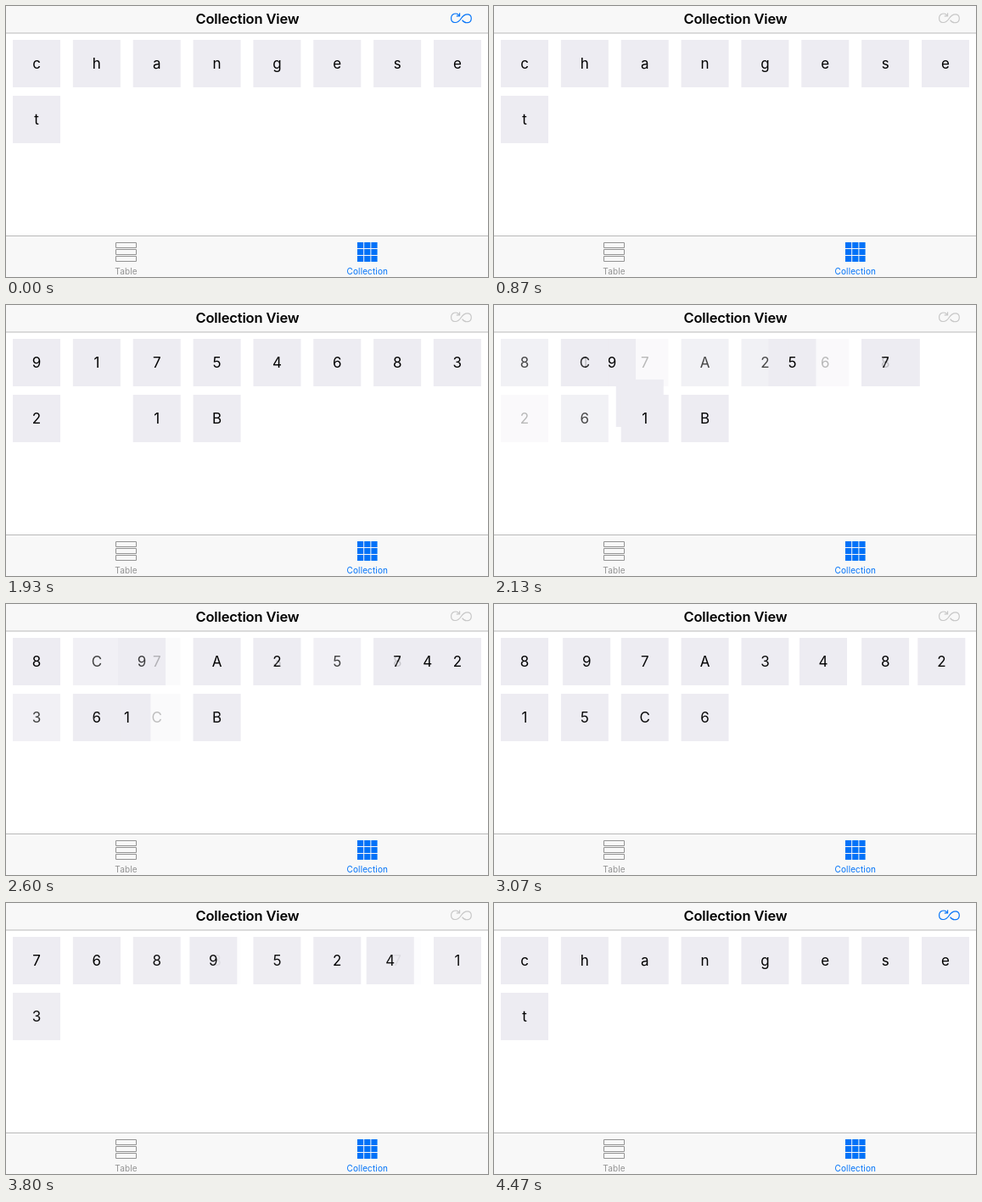
These frames come from a looping animation (568 px wide and 320 px high, 5000 ms). An HTML page:

```html
<!DOCTYPE html>
<html lang="en">
<head>
<meta charset="utf-8">
<title>Collection View</title>
<style>
  html, body { margin: 0; width: 100%; height: 100%; overflow: hidden; background: #fff; }
  #stage { position: relative; width: 568px; height: 320px; overflow: hidden; background: #fff; }
  #stage, text { font-family: Inter, Roboto, sans-serif; }
  svg { position: absolute; left: 0; top: 0; }
  .cell {
    position: absolute; left: 0; top: 0; width: 56px; height: 56px;
    background: #edecf2; color: #000;
    font-size: 17px; line-height: 56px; text-align: center;
  }
  .title { font-size: 16.5px; font-weight: 600; letter-spacing: -.15px; }
  .tab { font-size: 10px; letter-spacing: .12px; }
</style>
</head>
<body>
<div id="stage">
  <svg width="568" height="320" viewBox="0 0 568 320">
    <path fill="#f8f8f8" d="M0 0H568V32H0ZM0 271H568V320H0Z"/>
    <path fill="#b9b9b9" d="M0 31.5H568V32.5H0ZM0 271H568V272H0Z"/>
    <text class="title" x="284.5" y="21" text-anchor="middle">Collection View</text>
    <g id="loop" fill="none" stroke-width="1.15">
      <path d="M534 11.2C531 7.2 524.6 9 524.6 14.5C524.6 20.8 532.2 21.4 536.3 14.8S548.3 8.4 548.3 14.4C548.3 20.8 540.6 21.2 537.6 16.6"/>
      <path d="M534.6 8.2V11.8H530.8"/>
    </g>
    <path fill="none" stroke="#929292" d="M129.5 279.5h24v6h-24zM129.5 287.5h24v6h-24zM129.5 295.5h24v6h-24z"/>
    <text class="tab" x="141.5" y="317" text-anchor="middle" fill="#929292">Table</text>
    <g id="grid" fill="#0072f8"></g>
    <text class="tab" x="425.8" y="317" text-anchor="middle" fill="#0072f8">Collection</text>
  </svg>
</div>
<script>
const LOOP = 5000, FPS = 15, DURATION = 310;
const BUSY_FROM = 660, BUSY_TO = 4460;
const FIRST = "changeset";

// Each step: start time, new items, and [from, to] slots of items that slide.
const steps = [
  { at: 860, items: "64927513", moves: [] },
  { at: 1381, items: "917546832A1B", moves: [[2, 0], [4, 2], [5, 3]] },
  { at: 1930, items: "8C9A2574361B", moves: [[0, 2], [3, 5], [4, 7], [7, 8], [9, 99]] },
  { at: 2499, items: "897A348215C6", moves: [[2, 1], [7, 5], [10, 8], [7, 7]] },
  { at: 3033, items: "5198427", moves: [[1, 2], [5, 4], [7, 5]] },
  { at: 3536, items: "768952413", moves: [[2, 3], [4, 6]] },
  { at: 4110, items: FIRST, moves: [] }
];

const stage = document.getElementById("stage");
const loopIcon = document.getElementById("loop");
const pool = [];

const smooth = x => x * x * (3 - 2 * x);
const slotPos = i => [8 + (i % 8) * 496 / 7, 40 + Math.floor(i / 8) * 66];

function buildGrid() {
  const grid = document.getElementById("grid");
  for (let i = 0; i < 9; i++) {
    const r = document.createElementNS("http://www.w3.org/2000/svg", "rect");
    r.setAttribute("x", 414 + (i % 3) * 8.2);
    r.setAttribute("y", 279 + Math.floor(i / 3) * 8);
    r.setAttribute("width", 7.2);
    r.setAttribute("height", 7);
    grid.append(r);
  }
}

// Cells in paint order: kept, then leaving, then arriving.
function layout(a, b, moves, p) {
  const kept = [], leaving = [], arriving = [];
  const moved = new Set(moves.map(m => m[0]));
  const taken = new Set(moves.map(m => m[1]));
  const put = (list, text, i, alpha) => list.push({ text, pos: slotPos(i), alpha });

  for (const [from, to] of moves) {
    if (!b[to]) continue;
    const s = slotPos(from), e = slotPos(to);
    kept.push({ text: b[to], pos: s.map((v, k) => v + (e[k] - v) * p), alpha: 1 });
  }
  for (let i = 0; i < Math.max(a.length, b.length); i++) {
    const old = !moved.has(i) && a[i];
    const fresh = !taken.has(i) && b[i];
    if (old && fresh) {
      put(kept, old, i, 1);
      if (old !== fresh) put(arriving, fresh, i, smooth(p));
    } else if (old) {
      put(leaving, old, i, 1 - p);
    } else if (fresh) {
      put(arriving, fresh, i, p);
    }
  }
  return [...kept, ...leaving, ...arriving];
}

function cellsAt(t) {
  const n = steps.findLastIndex(s => s.at <= t);
  if (n < 0) return layout(FIRST, FIRST, [], 1);
  const { at, items, moves } = steps[n];
  const x = (t - at) / DURATION;
  if (x >= 1) return layout(items, items, [], 1);
  return layout(n ? steps[n - 1].items : FIRST, items, moves, smooth(x));
}

function draw(now) {
  const tick = Math.floor((now % LOOP) * FPS / 1000 + 0.1);
  const t = tick * 1000 / FPS;
  const cells = cellsAt(t);
  while (pool.length < cells.length) {
    const el = document.createElement("div");
    el.className = "cell";
    stage.append(el);
    pool.push(el);
  }
  pool.forEach((el, i) => {
    const c = cells[i];
    el.style.display = c ? "" : "none";
    if (!c) return;
    if (el.textContent !== c.text) el.textContent = c.text;
    el.style.opacity = c.alpha;
    el.style.transform = `translate(${c.pos[0]}px, ${c.pos[1]}px)`;
  });
  loopIcon.setAttribute("stroke", t > BUSY_FROM && t < BUSY_TO ? "#c6c6c6" : "#0072f8");
}

buildGrid();
const start = performance.now();
(function frame() {
  draw(performance.now() - start);
  requestAnimationFrame(frame);
})();
</script>
</body>
</html>
```
